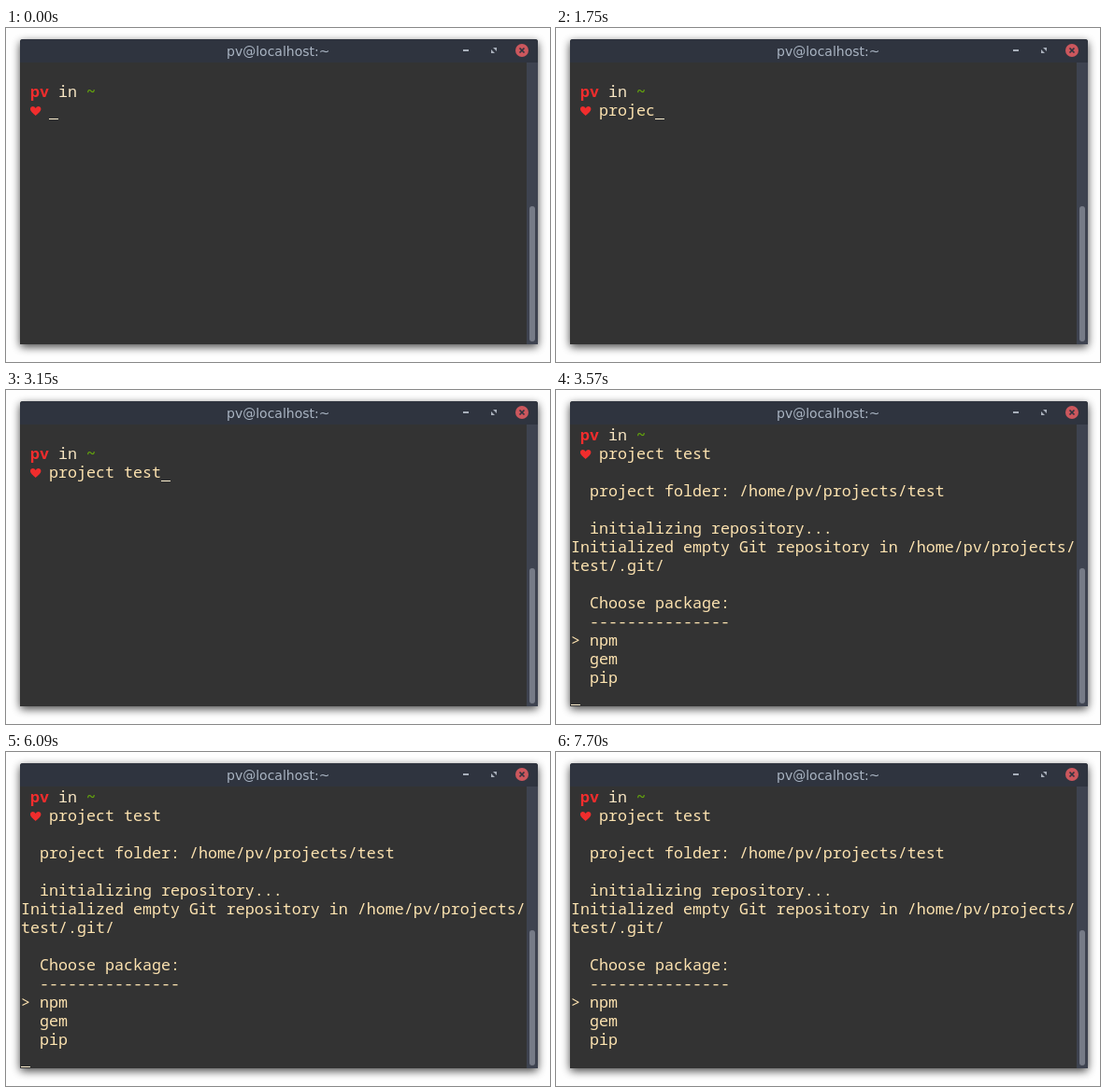
An HTML page that plays this animation: 582 by 358 pixels, repeating every 8000 ms.

```html
<!DOCTYPE html>
<html lang="en">
<head>
<meta charset="utf-8">
<title>Terminal</title>
<style>
  html, body { margin: 0; width: 100%; height: 100%; overflow: hidden; background: #fefefe; }
  svg { display: block; width: 582px; height: 358px; }
  text { white-space: pre; }
  .mono { font: 16.6667px "Noto Sans Mono", "DejaVu Sans Mono", monospace; fill: #fde3b0; }
  .bold { font-weight: 700; }
  .title { font: 14px "DejaVu Sans", sans-serif; fill: #a9b4c2; }
</style>
</head>
<body>
<svg viewBox="0 0 582 358" xmlns="http://www.w3.org/2000/svg">
  <defs>
    <filter id="blur" x="-10%" y="-10%" width="120%" height="120%">
      <feGaussianBlur stdDeviation="5"/>
    </filter>
  </defs>
  <rect width="582" height="358" fill="#fefefe"/>
  <rect x="15" y="15" width="554" height="327" rx="3" fill="#000" opacity=".72" filter="url(#blur)"/>

  <path d="M15 339V15q0-3 3-3H566q3 0 3 3V339z" fill="#333"/>
  <path d="M15 37V15q0-3 3-3H566q3 0 3 3V37z" fill="#2f343f"/>
  <rect x="557" y="37" width="12" height="302" fill="#3e4350"/>
  <rect x="560" y="191" width="6" height="145" rx="3" fill="#767b87"/>

  <text class="title" x="236" y="30">pv@localhost:~</text>
  <rect x="489" y="23" width="6" height="2" fill="#a9b0bb"/>
  <path d="M521 21h4v4zM519 23v4h4z" fill="#a9b0bb"/>
  <circle cx="552" cy="24" r="7" fill="#cc575d"/>
  <path d="M549.5 21.5l5 5m0-5l-5 5" stroke="#2f343f" stroke-width="1.7"/>

  <g id="prompt">
    <path d="M31.7 94C29 91.5 26 89.6 26 86.8C26 83.3 30.4 83 31.7 86C33 83 37.4 83.3 37.4 86.8C37.4 89.6 34.4 91.5 31.7 94z" fill="#f02d2d"/>
  </g>
  <g id="output"></g>
  <rect id="cursor" width="10" height="1" fill="#fff0d0"/>
</svg>
<script>
const LOOP = 8000, CELL = 10, ROW = 20, LEFT = 16, RUN = 3570;
const COMMAND = "project test";
const keyTimes = [980, 1190, 1330, 1540, 1680, 1750, 1960, 2380, 2730, 2870, 3080, 3150];
const hidden = [[420, 980], [4130, 4760], [5460, 6090], [7700, LOOP]];
// [time, selected item]
const moves = [[RUN, 0], [6160, 1], [6510, 2], [6930, 1], [7070, 0]];

const $ = id => document.getElementById(id);
const prompt = $("prompt"), output = $("output"), cursor = $("cursor");

function addText(parent, col, baseline, content, fill, bold) {
  const el = document.createElementNS("http://www.w3.org/2000/svg", "text");
  el.setAttribute("class", bold ? "mono bold" : "mono");
  el.setAttribute("x", LEFT + col * CELL);
  el.setAttribute("y", baseline);
  if (fill) el.style.fill = fill;
  el.textContent = content;
  parent.appendChild(el);
  return el;
}

addText(prompt, 1, 74, "pv", "#f02d2d", true);
addText(prompt, 4, 74, "in", "#f8e6c4");
addText(prompt, 7, 74, "~", "#63a30d", true);
const typed = addText(prompt, 3, 94, "");

[
  [2, 0, "project folder: /home/pv/projects/test"],
  [2, 2, "initializing repository..."],
  [0, 3, "Initialized empty Git repository in /home/pv/projects/"],
  [0, 4, "test/.git/"],
  [2, 6, "Choose package:"],
  [2, 7, "-".repeat(15)],
  [2, 8, "npm"],
  [2, 9, "gem"],
  [2, 10, "pip"]
].forEach(([col, row, line]) => addText(output, col, 114 + row * ROW, line));
const marker = addText(output, 0, 274, ">");

function render(t) {
  const count = keyTimes.filter(k => k <= t).length;
  const ran = t >= RUN;
  typed.textContent = COMMAND.slice(0, count);
  prompt.setAttribute("transform", `translate(0 ${ran ? -ROW : 0})`);
  output.setAttribute("visibility", ran ? "visible" : "hidden");

  const item = moves.reduce((sel, [at, i]) => t >= at ? i : sel, 0);
  marker.setAttribute("y", 274 + item * ROW);

  cursor.setAttribute("x", ran ? LEFT : LEFT + (3 + count) * CELL);
  cursor.setAttribute("y", ran ? 337 : 97);
  const off = hidden.some(([from, to]) => t >= from && t < to);
  cursor.setAttribute("visibility", off ? "hidden" : "visible");
}

const start = performance.now();
function tick(now) {
  render(Math.max(0, now - start) % LOOP);
  requestAnimationFrame(tick);
}
render(0);
requestAnimationFrame(tick);
</script>
</body>
</html>
```
